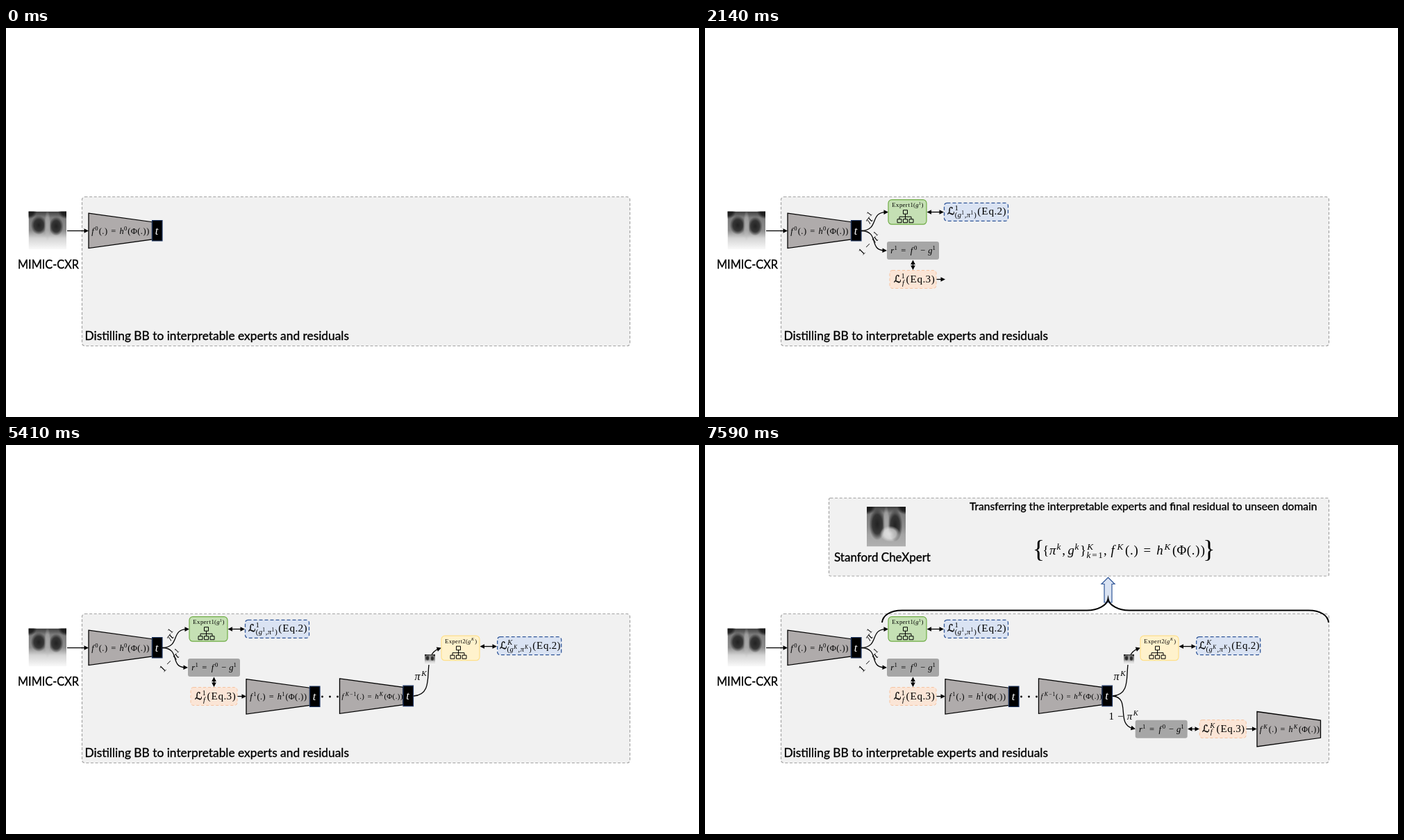
Recreate the animation shown at these times as an HTML page with a canvas. Size 998x561 px, loop 8 s.

```html
<!DOCTYPE html>
<html lang="en">
<head>
<meta charset="utf-8">
<title>Distilling experts and residuals</title>
<style>
  html, body { margin: 0; width: 100%; height: 100%; overflow: hidden; background: #fff; }
  canvas { display: block; width: 998px; height: 561px; }
</style>
</head>
<body>
<canvas id="stage"></canvas>
<script>
const W = 998, H = 561, LOOP = 8000;
const canvas = document.getElementById('stage');
const ratio = window.devicePixelRatio || 1;
canvas.width = W * ratio;
canvas.height = H * ratio;
const ctx = canvas.getContext('2d');

const BLACK = '#000', GREY = '#afabab', NAVY = '#2f5597';
const SERIF = '"Liberation Serif", serif';

// Advance of each math character, in em
const ADVANCE = {
  f: .55, h: .576, g: .513, 'π': .57, 'Φ': .722, t: .361, r: .43, K: .849, k: .52,
  'ℒ': .69, '(': .389, ')': .389, '.': .278, ',': .278, '=': .778, '−': .778,
  E: .681, q: .528, x: .528, p: .556, e: .444
};

// Text with a hairline outline for a slightly heavier weight
function inked(text, x, y, weight) {
  ctx.fillText(text, x, y);
  ctx.strokeStyle = ctx.fillStyle;
  ctx.lineWidth = weight;
  ctx.strokeText(text, x, y);
}

function label(text, x, y, size) {
  ctx.font = `${size}px Lato, sans-serif`;
  ctx.textAlign = 'left';
  ctx.fillStyle = BLACK;
  inked(text, x, y, .35);
}

function glyph(c, x, y, size, upright) {
  const italic = !upright && /[a-zA-Zπ]/.test(c);
  ctx.textAlign = 'center';
  if (c === 'ℒ') {
    ctx.font = `${size * .95}px "DejaVu Sans", serif`;
    inked(c, x, y, .4);
  } else {
    ctx.font = `${italic ? 'italic ' : ''}${size}px ${SERIF}`;
    ctx.fillText(c, x, y);
  }
}

// Small math typesetter: ^ and _ make scripts, quotes make upright text
function math(src, x, y, size, color = BLACK, script = false) {
  ctx.fillStyle = color;
  let pen = x, edge = x;
  const put = (c, upright) => {
    const adv = (ADVANCE[c] || .5) * size;
    const pad = script ? 0 : c === '=' ? .278 * size : c === '−' ? .222 * size : 0;
    pen = edge + pad;
    glyph(c, pen + adv / 2, y, size, upright);
    edge = pen + adv + pad + (c === ',' && !script ? .167 * size : 0);
    pen = edge;
  };
  for (const m of src.matchAll(/([\^_])(?:\{([^}]*)\}|(.))|"([^"]*)"|(.)/gu)) {
    if (m[1]) {
      const dy = m[1] === '^' ? -.39 : .25;
      const end = math(m[2] || m[3], pen, y + dy * size, size * .7, color, true);
      edge = Math.max(edge, end + .05 * size);
    } else if (m[4]) {
      for (const c of m[4]) put(c, true);
    } else {
      put(m[5], false);
    }
  }
  return edge;
}

function tilted(src, x, y, size, degrees) {
  ctx.save();
  ctx.translate(x, y);
  ctx.rotate(degrees * Math.PI / 180);
  math(src, 0, 0, size);
  ctx.restore();
}

function box(x, y, w, h, r, fill, stroke, dash = [], width = 1.2) {
  ctx.beginPath();
  ctx.roundRect(x, y, w, h, r);
  ctx.fillStyle = fill;
  ctx.fill();
  if (!stroke) return;
  ctx.setLineDash(dash);
  ctx.strokeStyle = stroke;
  ctx.lineWidth = width;
  ctx.stroke();
  ctx.setLineDash([]);
}

function polygon(points, fill, stroke, width) {
  ctx.beginPath();
  points.forEach(([x, y]) => ctx.lineTo(x, y));
  ctx.closePath();
  ctx.fillStyle = fill;
  ctx.fill();
  if (!stroke) return;
  ctx.strokeStyle = stroke;
  ctx.lineWidth = width;
  ctx.stroke();
}

function head(x, y, angle) {
  ctx.save();
  ctx.translate(x, y);
  ctx.rotate(angle);
  polygon([[0, 0], [-6.5, -3.3], [-6.5, 3.3]], BLACK);
  ctx.restore();
}

function arrow(x0, y0, x1, y1, both) {
  const a = Math.atan2(y1 - y0, x1 - x0);
  const cx = 4 * Math.cos(a), cy = 4 * Math.sin(a), back = both ? 1 : 0;
  ctx.beginPath();
  ctx.moveTo(x0 + cx * back, y0 + cy * back);
  ctx.lineTo(x1 - cx, y1 - cy);
  ctx.strokeStyle = BLACK;
  ctx.lineWidth = 1.3;
  ctx.stroke();
  head(x1, y1, a);
  if (both) head(x0, y0, a + Math.PI);
}

function curve(x0, y0, ax, ay, bx, by, x1, y1) {
  const a = Math.atan2(y1 - by, x1 - bx);
  ctx.beginPath();
  ctx.moveTo(x0, y0);
  ctx.bezierCurveTo(ax, ay, bx, by, x1 - 4 * Math.cos(a), y1 - 4 * Math.sin(a));
  ctx.strokeStyle = BLACK;
  ctx.lineWidth = 1.3;
  ctx.stroke();
  head(x1, y1, a);
}

function network(x, y, src, textX, size, gate = true) {
  polygon([[x, y - 25.3], [x + 91.5, y - 12.8], [x + 91.5, y + 12.5], [x, y + 25.1]], GREY, BLACK, 1.3);
  math(src, textX, y + 4, size);
  if (!gate) return;
  box(x + 91.5, y - 15, 14.5, 29.5, 0, BLACK, '#203864');
  math('t', x + 95, y + 5, 16.5, '#fff');
}

function expert(x, y, fill, stroke, src, size) {
  box(x, y, 55, 35.5, 5, fill, stroke);
  math(src, x + 5, y + 10.3, size);
  ctx.strokeStyle = BLACK;
  ctx.lineWidth = 1;
  ctx.beginPath();
  ctx.rect(x + 21.5, y + 15, 6, 5.5);
  ctx.moveTo(x + 24.5, y + 20.5);
  ctx.lineTo(x + 24.5, y + 28);
  ctx.moveTo(x + 16, y + 28);
  ctx.lineTo(x + 16, y + 24.5);
  ctx.lineTo(x + 33, y + 24.5);
  ctx.lineTo(x + 33, y + 28);
  for (const dx of [13, 21.5, 30]) ctx.rect(x + dx, y + 28, 6, 5);
  ctx.stroke();
}

const panel = (x, y, w, h, r) => box(x, y, w, h, r, '#f1f1f1', '#a3a3a3', [4, 2.6]);
const expertLoss = (x, y) => box(x, y, 92, 26, 4, '#dae3f3', NAVY, [5, 3], 1.3);
const residualLoss = (x, y) => box(x, y, 67, 26, 4, '#fbe5d6', '#f6c3a0', [4, 3], 1);

function residual(x, y) {
  box(x, y, 75, 26, 3, '#a6a6a6');
  math('r^1=f^0−g^1', x + 5, y + 16.8, 12.5);
}

function glow(x, y, rx, ry, tone, alpha) {
  ctx.save();
  ctx.translate(x, y);
  ctx.scale(rx, ry);
  const rgb = `${tone},${tone},${tone}`;
  const g = ctx.createRadialGradient(0, 0, 0, 0, 0, 1);
  g.addColorStop(0, `rgba(${rgb},${alpha})`);
  g.addColorStop(.6, `rgba(${rgb},${alpha * .8})`);
  g.addColorStop(1, `rgba(${rgb},0)`);
  ctx.fillStyle = g;
  ctx.fillRect(-1, -1, 2, 2);
  ctx.restore();
}

// Soft chest scan in a unit square
function scan(x, y, w, h, bright) {
  ctx.save();
  ctx.beginPath();
  ctx.rect(x, y, w, h);
  ctx.clip();
  ctx.translate(x, y);
  ctx.scale(w, h);
  const g = ctx.createLinearGradient(0, 0, 0, 1);
  g.addColorStop(0, '#3c3c3c');
  g.addColorStop(.16, '#7c7c7c');
  g.addColorStop(.5, '#8c8c8c');
  g.addColorStop(.7, bright ? '#d4d4d4' : '#a4a4a4');
  g.addColorStop(1, bright ? '#fafafa' : '#b0b0b0');
  ctx.fillStyle = g;
  ctx.fillRect(0, 0, 1, 1);
  const ry = bright ? .25 : .4, cy = bright ? .36 : .44;
  glow(0, 0, .22, .2, 15, .9);
  glow(1, 0, .22, .2, 15, .9);
  glow(.27, cy, .21, ry, 28, .95);
  glow(.73, cy + .03, .19, ry, 28, .95);
  glow(.5, .38, .09, .4, 190, .6);
  if (!bright) glow(.6, .68, .26, .2, 235, .85);
  ctx.restore();
}

function base() {
  panel(109.5, 243.5, 789, 215, 4);
  scan(32.5, 264.5, 54.5, 55, true);
  label('MIMIC-CXR', 17, 347, 16.3);
  label('Distilling BB to interpretable experts and residuals', 113.5, 449.5, 17.35);
  arrow(88, 292.5, 119, 292.5);
  network(119, 292.5, 'f^0(.)=h^0(Φ(.))', 121.5, 12.4);
}

function firstExpert() {
  curve(225, 292.5, 251, 292, 237, 266, 264, 265.5);
  tilted('π^1', 237, 283.5, 16, -52);
  expert(264, 247.7, '#c5e0b4', '#70ad47', '"Expert1"(g^1)', 8.8);
  arrow(319.5, 265.5, 344, 265.5, true);
  expertLoss(344.5, 252.3);
  math('ℒ^1_{(g^1,π^1)}"(Eq.2)"', 349, 269.3, 15.3);
}

function firstResidual() {
  curve(225, 292.5, 252, 293, 235, 320, 262, 321);
  tilted('1−π^1', 226.5, 328.5, 14.6, -45);
  residual(262, 308);
  arrow(299.5, 334.5, 299.5, 349, true);
  residualLoss(266, 349.5);
  math('ℒ^1_f"(Eq.3)"', 272, 367, 15.2);
  arrow(333.5, 362.5, 346, 362.5);
}

function secondNetwork() {
  network(346, 363, 'f^1(.)=h^1(Φ(.))', 349.5, 12.2);
}

function lastNetwork() {
  ctx.fillStyle = BLACK;
  for (const x of [455.5, 466.5, 477.5]) {
    ctx.beginPath();
    ctx.arc(x, 363, 1.4, 0, 2 * Math.PI);
    ctx.fill();
  }
  network(480.5, 362.2, 'f^{K−1}(.)=h^K(Φ(.))', 482, 10.9);
}

function lastExpert() {
  curve(587, 362, 624, 360, 594, 304, 627, 292.5);
  scan(603, 302, 15, 15, true);
  math('π^K', 588, 339, 16);
  expert(627, 275.2, '#fff2cc', '#ffe08a', '"Expert2"(g^K)', 8.5);
  arrow(682.5, 290.5, 707, 290.5, true);
  expertLoss(707.7, 276.7);
  math('ℒ^K_{(g^K,π^K)}"(Eq.2)"', 711, 294, 14.9);
}

function lastResidual() {
  curve(587, 362, 614, 364, 591, 403, 620, 409.5);
  math('1−π^K', 581.5, 396, 15);
  residual(619.7, 396.7);
  arrow(695, 409.5, 712, 409.5, true);
  residualLoss(712.3, 396.5);
  math('ℒ^K_f"(Eq.3)"', 716, 413.5, 15);
  arrow(779.5, 409.5, 794.5, 409.5);
  network(795, 409.8, 'f^K(.)=h^K(Φ(.))', 797, 12, false);
}

function transfer() {
  panel(178.5, 76.5, 720, 112.5, 2);
  scan(233, 89, 56, 57.5, false);
  label('Stanford CheXpert', 186, 167.5, 17);
  label('Transferring the interpretable experts and final residual to unseen domain', 381, 94, 15.6);
  math('"{"π^k,g^k"}"^K_{k=1},f^K(.)=h^K(Φ(.))', 486, 158.3, 18.8);
  glyph('{', 480.5, 161.5, 36, true);
  glyph('}', 726, 161.5, 36, true);

  polygon([[580.5, 191], [590, 200.5], [586, 200.5], [586, 227], [575, 227], [575, 200.5], [571, 200.5]],
    '#dae3f3', NAVY, 1.2);

  ctx.beginPath();
  ctx.moveTo(255, 256);
  ctx.bezierCurveTo(256, 246, 266, 238.5, 284, 238.5);
  ctx.lineTo(550, 238.5);
  ctx.bezierCurveTo(566, 238.5, 579, 231, 580.5, 222);
  ctx.bezierCurveTo(582, 231, 595, 238.5, 611, 238.5);
  ctx.lineTo(869, 238.5);
  ctx.bezierCurveTo(887, 238.5, 897, 246, 898, 256);
  ctx.strokeStyle = BLACK;
  ctx.lineWidth = 2;
  ctx.stroke();
}

const STEPS = [
  [0, base], [1050, firstExpert], [2140, firstResidual], [3230, secondNetwork],
  [4320, lastNetwork], [5410, lastExpert], [6500, lastResidual], [7590, transfer]
];

const start = performance.now();

function frame() {
  const time = (performance.now() - start) % LOOP;
  ctx.setTransform(ratio, 0, 0, ratio, 0, 0);
  ctx.fillStyle = '#fff';
  ctx.fillRect(0, 0, W, H);
  for (const [at, draw] of STEPS) if (time >= at) draw();
  requestAnimationFrame(frame);
}
frame();
</script>
</body>
</html>
```
